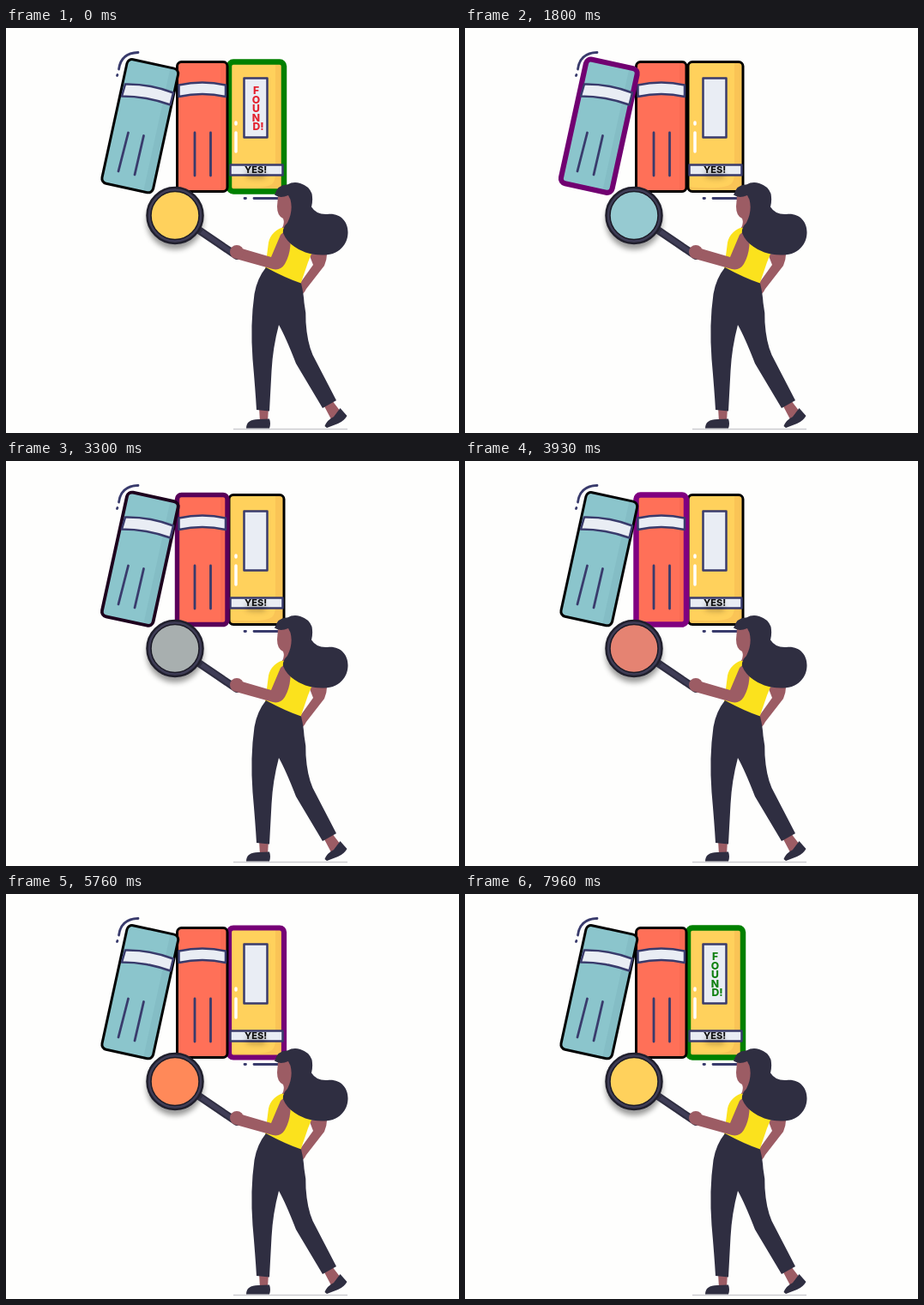
An HTML page that plays this animation: 528x472 px, repeating every 8000 ms.

```html
<!DOCTYPE html>
<html lang="en">
<head>
<meta charset="utf-8">
<title>Find the book</title>
<style>
  html, body { margin: 0; width: 100%; height: 100%; overflow: hidden; background: #fefefd; }
  svg { display: block; width: 528px; height: 472px; }
  text { font-family: Inter, "Open Sans", sans-serif; font-weight: 800; text-anchor: middle; }
  .line { fill: none; stroke: #393b6c; stroke-width: 2.8; stroke-linecap: round; }
  .label { fill: #e9edf4; stroke: #393b6c; stroke-width: 2.5; stroke-linejoin: round; }
  .cover { fill: none; stroke: #000; stroke-width: 3; }
  .dark { fill: #2f2e41; }
  .skin { fill: #9c5c64; }
</style>
</head>
<body>
<svg viewBox="0 0 528 472">
  <defs>
    <filter id="blur" x="-50%" y="-50%" width="200%" height="200%"><feGaussianBlur stdDeviation="3"/></filter>
  </defs>

  <g class="line">
    <path d="M131.500 48Q134 29 154 28.500M129.500 55.500l.4-1"/>
    <path d="M278 198.500h1.500M289 198.500h34"/>
  </g>

  <g id="yellow-book">
    <rect x="260" y="39.500" width="64" height="151" rx="5" fill="#ffd15c"/>
    <path d="M314 40h5q4 0 4 4v142q0 4-4 4h-55q-4-1-4-5 40 4 50-3 4-4 4-12z" fill="#fac456"/>
    <rect id="cover3" class="cover" x="260" y="39.500" width="64" height="151" rx="5"/>
    <path d="M268 110v2M268 122v22" fill="none" stroke="#fff" stroke-width="3.500" stroke-linecap="round"/>
    <rect class="label" x="277.500" y="58.500" width="27" height="69"/>
    <path class="label" d="M261.500 159.500h61v12h-61z"/>
    <text x="291" y="175" font-size="10" fill="#000" opacity=".5" filter="url(#blur)">YES!</text>
    <text x="291" y="168.800" font-size="11" fill="#111">YES!</text>
    <g id="found" font-size="12.200"></g>
  </g>

  <g id="red-book">
    <rect x="199.500" y="39.500" width="58.500" height="151" rx="5" fill="#ff7058"/>
    <path d="M250 40h4q4 0 4 4v142q0 4-4 4h-4z" fill="#f96a53"/>
    <rect id="cover2" class="cover" x="199.500" y="39.500" width="58.500" height="151" rx="5"/>
    <path class="label" d="M201.500 66.500Q229 60.500 256 66.500V80Q229 74 201.500 80z"/>
    <path class="line" d="M220 122v50M238.500 122v50"/>
  </g>

  <g id="teal-book">
    <g transform="translate(156.300 114.200) rotate(12.300)">
      <rect x="-30.500" y="-74" width="61" height="148" rx="6" fill="#8bc5cc"/>
      <path d="M20-73h5q5 0 5 5V68q0 5-5 5h-5z" fill="#84bdc5"/>
      <rect id="cover1" class="cover" x="-30.500" y="-74" width="61" height="148" rx="6"/>
    </g>
    <path class="label" d="M139 65.500Q168 65 195 75.500L191.500 89.500Q164 79.500 135 79.500z"/>
    <path class="line" d="M142.500 122L131 167M160.500 125.500L150 171"/>
  </g>

  <g id="magnifier">
    <circle cx="197" cy="225" r="33" opacity=".4" filter="url(#blur)"/>
    <path d="M224 235L269 265.500" stroke="#2f2e41" stroke-width="9" stroke-linecap="round"/>
    <path d="M228 237.500L264 262" stroke="#3f3d56" stroke-width="5"/>
    <circle cx="197" cy="218.500" r="32.500" fill="#3f3d56" stroke="#201f2c" stroke-width="2.500"/>
    <circle id="lens" cx="197" cy="218.500" r="28" stroke="#1b1a26" stroke-width="1.500"/>
  </g>

  <g id="woman">
    <path d="M265 467.500H398" stroke="#cbcbd0" stroke-width="1.500"/>
    <path class="skin" d="M295 442h11l-1 17h-9zM370 439l10-5 10 13-11 9z"/>
    <path class="dark" d="M280 466.500Q280 456 294 456L307 455.500Q309 461 307 466.500zM371.500 464Q374 457 382 453L389.500 443 397.500 452Q394 458 387 461L374 466z"/>
    <path class="skin" d="M353 263L374 264Q374 270 371 277L350 304Q345 314 341 309L343 297 358 276z"/>
    <path d="M302 281L306 250Q309 236 326 231L357 261 352 273 343.500 298z" fill="#fbe21d"/>
    <path class="dark" d="M303 279Q325 291 344 297.500Q347 310 347.500 320Q350 332 349.500 343Q351 366 357.500 381L385 434 369 443 338 391Q326 360 318 346Q311 372 309.500 400L307 446.500 292 445Q290.500 420 287.500 386Q284.500 345 289.500 310Q292.500 292 303 279z"/>
    <path class="skin" d="M317 196L332 194 336 232 322 233Q325 227 323 222Q316 219 316 208z"/>
    <path class="skin" d="M268 255L309 267 320 241Q326 234 331.500 244Q332.500 262 325 275Q320 283 311 281L268 269z"/>
    <circle class="skin" cx="269" cy="261" r="8"/>
    <path class="dark" d="M313 194.500Q317 182 328 182.500Q335 178.500 343 181Q353 184 356.500 193Q358 201 356 208.500Q362 218 375 217C390 215.500 399 226 398.500 239C398 254 386 264.500 371 264.500Q359 265 349 261.500Q329 254 323 239Q322 233 328 227Q335 213 331.500 200L329 195Q319 199 313 194.500z"/>
  </g>
</svg>
<script>
const LOOP = 8000, RESTART = 660;
const BLACK = [0, 0, 0], PURPLE = [128, 0, 128], GREEN = [0, 128, 0];
const WHITE = [255, 255, 255], TEAL = [139, 197, 204], CORAL = [255, 112, 88], YELLOW = [255, 209, 92];
const THIN = 3, THICK = 6.5;
const byId = id => document.getElementById(id);

const found = byId('found');
['F', 'O', 'U', 'N', 'D!'].forEach((letter, i) => {
  const text = document.createElementNS('http://www.w3.org/2000/svg', 'text');
  text.setAttribute('x', i === 4 ? 294 : 291.5);
  text.setAttribute('y', 77 + 10.5 * i);
  text.textContent = letter;
  found.append(text);
});

// The CSS "ease" curve, cubic-bezier(.25, .1, .25, 1)
function ease(x) {
  if (x <= 0 || x >= 1) return x <= 0 ? 0 : 1;
  const bezier = (u, a, b) => 3 * u * (1 - u) ** 2 * a + 3 * u * u * (1 - u) * b + u ** 3;
  let low = 0, high = 1;
  for (let i = 0; i < 20; i++) {
    const mid = (low + high) / 2;
    if (bezier(mid, .25, .25) < x) low = mid; else high = mid;
  }
  return bezier(low, .1, 1);
}

const mix = (a, b, k) => a.map((v, i) => v + (b[i] - v) * k);
const css = c => `rgb(${c.map(Math.round)})`;

// Each step is [start, end, value]: ease from the value so far to the new one.
function track(t, first, steps) {
  return steps.reduce((value, [start, end, next]) => mix(value, next, ease((t - start) / (end - start))), first);
}

const covers = {
  cover1: [[0, 1900, [...PURPLE, THICK]], [2100, 3250, [...BLACK, THIN]]],
  cover2: [[2150, 3350, [...PURPLE, THICK]], [3400, 4400, [...BLACK, THIN]]],
  cover3: [[4130, 5600, [...PURPLE, THICK]], [5700, 6600, [...GREEN, THICK]]]
};
const lensSteps = [[0, 1800, TEAL], [2250, 4400, CORAL], [4650, 7100, YELLOW]];

function draw(now) {
  const time = now % LOOP;
  const holding = time < RESTART;
  const t = holding ? LOOP : time - RESTART;
  for (const id in covers) {
    const [r, g, b, width] = track(t, [...BLACK, THIN], covers[id]);
    byId(id).style.stroke = css([r, g, b]);
    byId(id).style.strokeWidth = width;
  }
  byId('lens').style.fill = css(track(t, WHITE, lensSteps));
  found.style.fill = holding ? '#e3222f' : '#108010';
  found.style.opacity = ease((t - 6500) / 700);
}

const begin = performance.now();
function tick() {
  draw(performance.now() - begin);
  requestAnimationFrame(tick);
}
tick();
</script>
</body>
</html>
```
